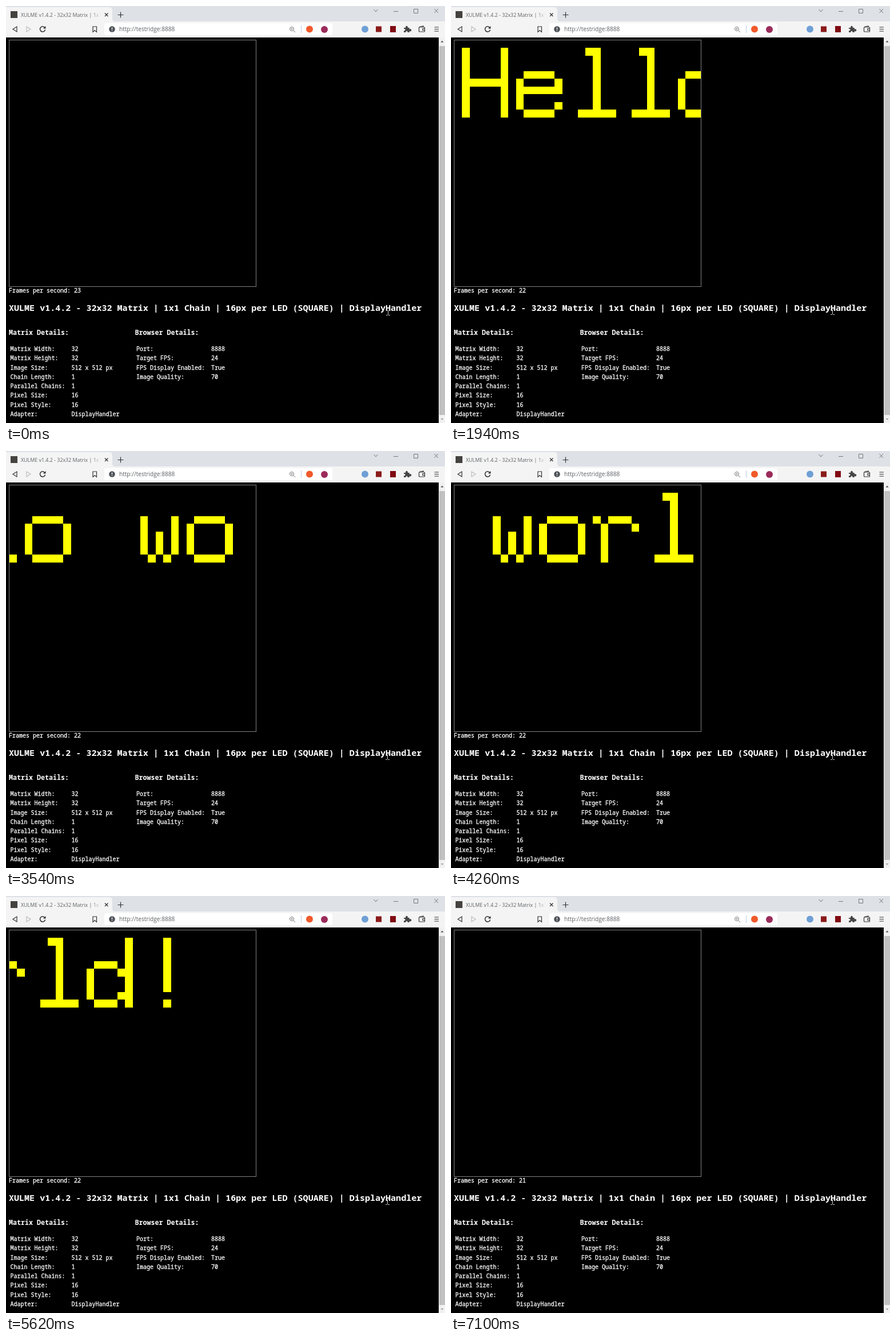
Animation of 768x729 px, one loop 7.18 s. Source, as an HTML page:

```html
<!DOCTYPE html>
<html lang="en">
<head>
<meta charset="utf-8">
<title>LED matrix text</title>
<style>
  html, body { margin: 0; width: 100%; height: 100%; overflow: hidden; background: #000; }
  svg { display: block; }
  text { white-space: pre; }
  .ui { font-family: "Open Sans", "Noto Sans", sans-serif; fill: #5c5f63; }
  .page { font: 500 10px "Noto Sans Mono", "DejaVu Sans Mono", monospace; fill: #fff; stroke: #fff; stroke-width: .3; }
  .bold { font-weight: 700; stroke: none; }
  .line { fill: none; stroke: #333; stroke-width: 1.2; }
  .thin { stroke: #777; stroke-width: 1; }
</style>
</head>
<body>
<svg width="768" height="729" viewBox="0 0 768 729">
  <defs>
    <linearGradient id="fade">
      <stop offset="0" stop-color="#f4f4f4" stop-opacity="0"/>
      <stop offset="1" stop-color="#f4f4f4"/>
    </linearGradient>
    <clipPath id="panel"><rect x="6" y="60" width="431" height="431"/></clipPath>
  </defs>

  <!-- tab strip -->
  <rect width="768" height="28" fill="#dee1e6"/>
  <path d="M0 28V2H180Q186 2 186 8V22Q186 27 191 28Z" fill="#f4f4f4"/>
  <rect x="8" y="9" width="12" height="12" fill="#45433f"/>
  <text class="ui" id="tabTitle" x="26" y="18.5" font-size="8.9"></text>
  <rect x="150" y="6" width="16" height="18" fill="url(#fade)"/>
  <rect x="166" y="6" width="4" height="18" fill="#f4f4f4"/>
  <path class="line" d="M173 12.500l5.500 5.500m0-5.500l-5.500 5.500M195.500 15.500h10M200.500 10.500v10"/>
  <path class="line thin" d="M643.500 6l3.500 4 3.500-4M678 9.500h8M713.500 5.500h7v7h-7zM749.500 5l6.500 7m0-7l-6.500 7"/>

  <!-- toolbar -->
  <rect y="27" width="768" height="28" fill="#f4f4f4"/>
  <rect x="172" y="30" width="399" height="21" rx="3" fill="#fff"/>
  <path class="line" d="M19 36v9l-7-4.500z"/>
  <path class="line" style="stroke:#bbb" d="M36 36v9l7-4.500z"/>
  <path class="line" style="stroke-width:1.500" d="M68 38a4.600 4.600 0 1 0 .6 3.500"/>
  <path d="M69.500 35v4.500H65z" fill="#333"/>
  <path class="line" d="M152 36h6.500v9.500l-3.250-3-3.250 3z"/>
  <circle cx="185.500" cy="40.500" r="5.300" fill="#50545a"/>
  <path d="M185.500 37.500v3.500M185.500 42.300v1.300" stroke="#fff" stroke-width="1.300"/>
  <text class="ui" x="198" y="44.300" font-size="10.15">http://testridge:8888</text>
  <circle class="line thin" cx="500" cy="40" r="3.500"/>
  <path class="line thin" d="M502.500 42.500l3.500 3.500M498.500 40h3M500 38.500v3"/>
  <path d="M516.500 34v13" stroke="#b9cbe3"/>
  <circle cx="531" cy="40.500" r="6" fill="#f0592b"/>
  <circle cx="557" cy="41" r="6" fill="#9b2b5b"/>
  <circle cx="628" cy="40.500" r="6" fill="#6fa0d5"/>
  <rect x="647" y="35.500" width="10" height="10" fill="#8b1a1a"/>
  <rect x="672" y="35" width="10" height="11" fill="#800a12"/>
  <path fill="#444" d="M696 38h3.300a2 2 0 1 1 3.400 0h3v3a2 2 0 1 1 0 2.500v2.500h-3.200a1.600 1.600 0 1 0-3 0H696v-3a1.700 1.700 0 1 0 0-3z"/>
  <rect class="line" x="722.500" y="37" width="10" height="8" rx="1"/>
  <path class="line" d="M723 36.500l7-1.500v2M733 39.500h-4v3h4M749.500 37h7.500M749.500 40.500h7.500M749.500 44h7.500"/>

  <!-- scrollbar -->
  <rect x="757" y="55" width="11" height="674" fill="#f1f1f1"/>
  <rect x="758" y="70" width="10" height="645" fill="#c1c1c1"/>
  <path d="M760.500 63.500l2.500-3 2.500 3z" fill="#505050"/>
  <path d="M760.500 721l2.500 3 2.500-3z" fill="#a3a3a3"/>

  <!-- matrix -->
  <rect x="5.500" y="59.500" width="432" height="431" fill="none" stroke="#808080"/>
  <path id="leds" fill="#ff0" clip-path="url(#panel)" shape-rendering="crispEdges"/>

  <g id="details" class="page"></g>
  <g id="cursor" fill="none" stroke="#cfcfcf">
    <path d="M-3.500-4.500h2.500l1 1 1-1h2.500M-3.500 4.500h2.500l1-1 1 1h2.500M0-3.500v7"/>
  </g>
</svg>
<script>
const LOOP = 7180;
const MESSAGE = "Hello world!";
const HEADING = "XULME v1.4.2 - 32x32 Matrix | 1x1 Chain | 16px per LED (SQUARE) | DisplayHandler";
const ADVANCE = 7;
const SLICE = 6;

// Strokes of each glyph as x, y, width, height digits in LED cells.
const GLYPHS = {
  "H": "0019 5019 1441",
  "e": "1341 0414 5411 1551 5711 1841",
  "l": "2011 3019 1851",
  "o": "1341 0414 5414 1841",
  "w": "1315 3513 5315 2811 4811",
  "r": "0311 2331 1415 5411",
  "d": "5019 1331 0414 4411 4711 1831",
  "!": "3017 3811"
};

// Scroll position in cells, [ms, cell].
const SCROLL = [[0, 34.2], [1180, 14.5], [2780, -12.5], [4260, -37.17],
                [5100, -50.5], [6220, -69.5], [LOOP, -85.5]];

const byId = id => document.getElementById(id);
const details = byId("details");

function addText(x, y, content, size, bold) {
  const node = document.createElementNS("http://www.w3.org/2000/svg", "text");
  node.setAttribute("x", x);
  node.setAttribute("y", y);
  if (size) node.style.fontSize = size + "px";
  if (bold) node.setAttribute("class", "bold");
  node.textContent = content;
  details.appendChild(node);
  return node;
}

function addTable(labelX, valueX, rows) {
  rows.forEach(([label, value], i) => {
    const y = 603 + Math.round(i * 16.25);
    addText(labelX, y, label + ":");
    addText(valueX, y, value);
  });
}

byId("tabTitle").textContent = HEADING.slice(0, 33);
const fps = addText(5, 501, "");
addText(5, 533, HEADING, 15.05, true);
addText(5, 574.5, "Matrix Details:", 11.67, true);
addText(225.5, 574.5, "Browser Details:", 11.67, true);
addTable(7.5, 114.5, [
  ["Matrix Width", "32"], ["Matrix Height", "32"], ["Image Size", "512 x 512 px"],
  ["Chain Length", "1"], ["Parallel Chains", "1"], ["Pixel Size", "16"],
  ["Pixel Style", "16"], ["Adapter", "DisplayHandler"]
]);
addTable(228, 359, [
  ["Port", "8888"], ["Target FPS", "24"],
  ["FPS Display Enabled", "True"], ["Image Quality", "70"]
]);

const edge = (start, cell) => Math.round(start + cell * 431 / 32);

function scrollAt(t) {
  const i = SCROLL.findIndex(([end]) => end > t);
  const [t0, x0] = SCROLL[i - 1], [t1, x1] = SCROLL[i];
  return Math.floor(x0 + (x1 - x0) * (t - t0) / (t1 - t0));
}

// Only a slice of the message is drawn, so letters can pop in at the right edge.
function messagePath(x) {
  const first = Math.max(0, Math.floor(-x / ADVANCE) - 1);
  let path = "";
  [...MESSAGE].slice(first, first + SLICE).forEach((char, i) => {
    const origin = x + (first + i) * ADVANCE;
    if (!GLYPHS[char]) return;
    for (const stroke of GLYPHS[char].split(" ")) {
      const [cx, cy, w, h] = [...stroke].map(Number);
      const left = edge(6, origin + cx), right = edge(6, origin + cx + w);
      const top = edge(60, cy + 1), bottom = edge(60, cy + 1 + h);
      path += `M${left} ${top}H${right}V${bottom}H${left}Z`;
    }
  });
  return path;
}

function render(t) {
  const step = Math.max(0, Math.floor((t - 20) / 40) * 40 + 20);
  byId("leds").setAttribute("d", messagePath(scrollAt(step)));
  fps.textContent = "Frames per second: " + (t < 80 ? 23 : t < 7100 ? 22 : 21);
  byId("cursor").setAttribute("transform", t < 820 ? "translate(668.5 536)" : "translate(667.5 535)");
}

const start = performance.now();
function tick() {
  render((performance.now() - start) % LOOP);
  requestAnimationFrame(tick);
}
tick();
</script>
</body>
</html>
```
